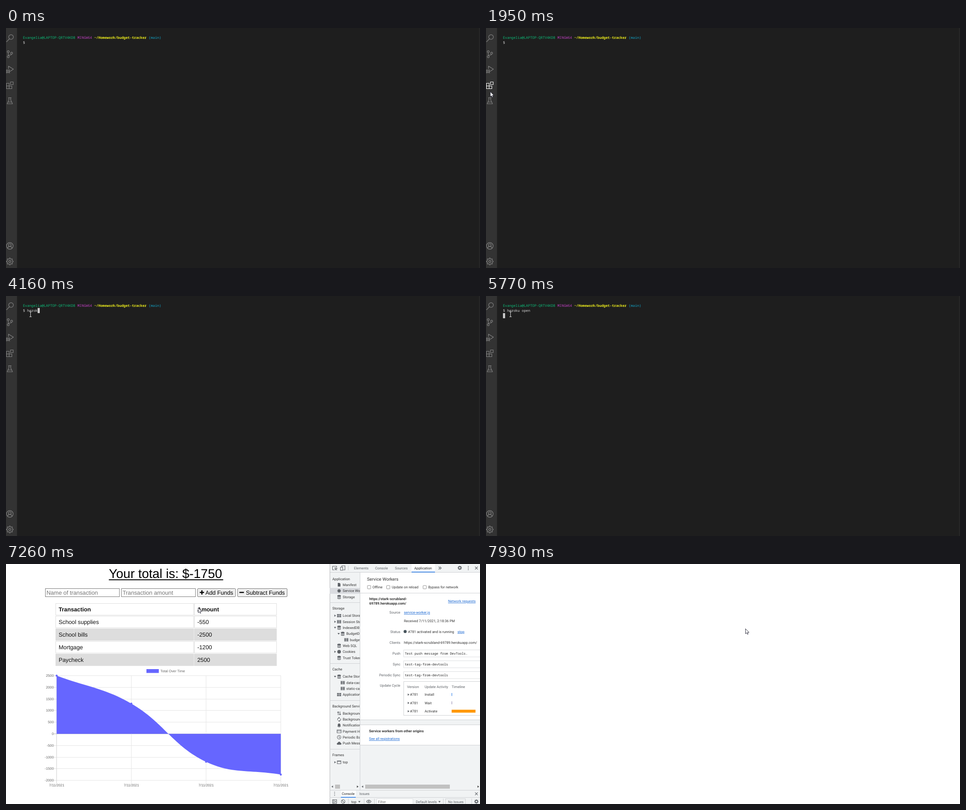
Write an HTML page that moves like this. It is 1053 by 532 pixels and loops after 8 s.

```html
<!DOCTYPE html>
<html lang="en">
<head>
<meta charset="utf-8">
<title>Terminal and budget tracker</title>
<style>
html, body { margin: 0; width: 100%; height: 100%; overflow: hidden; background: #fff; }
svg { display: block; width: 100%; height: 100%; }
text { text-rendering: geometricPrecision; white-space: pre; }
.mono { font-family: "Noto Sans Mono", monospace; }
.arial { font-family: "Liberation Sans", Arial, sans-serif; }
.ui { font-family: Roboto, sans-serif; }
.icon { fill: none; stroke: #858585; stroke-width: 1.15; stroke-linejoin: round; }
.icon.on { stroke: #fff; }
.tool { fill: none; stroke: #5f6368; stroke-width: 1.1; }
</style>
</head>
<body>
<svg id="stage" viewBox="0 0 1053 532" xmlns="http://www.w3.org/2000/svg">
  <defs><clipPath id="sideClip"><rect x="719" y="19" width="67" height="468"/></clipPath></defs>
  <g id="term"></g>
  <g id="page"></g>
  <g id="tip"></g>
  <g id="beam"><path d="M-2.5-5.5h5M-2.5 5.5h5M0-5.5v11" fill="none" stroke="#e4e4e4"/></g>
  <g id="arrow"><path d="M0 0V11.2L2.6 8.8 4.3 12.4 6 11.6 4.4 8.1H7.8Z" fill="#fff" stroke="#223" stroke-width=".9"/></g>
</svg>
<script>
const NS = 'http://www.w3.org/2000/svg';
const $ = id => document.getElementById(id);
const term = $('term'), page = $('page'), tip = $('tip');

function add(parent, tag, attrs, content) {
  const el = document.createElementNS(NS, tag);
  for (const k in attrs) el.setAttribute(k, attrs[k]);
  if (content !== undefined) el.textContent = content;
  parent.appendChild(el);
  return el;
}
const rect = (p, x, y, width, height, fill, more) => add(p, 'rect', { x, y, width, height, fill, ...more });
const text = (p, cls, x, y, s, size, fill, more) =>
  add(p, 'text', { class: cls, x, y, 'font-size': size, fill, ...more }, s);
const path = (p, d, attrs) => add(p, 'path', { d, ...attrs });
const line = (p, d, stroke) => path(p, d, { fill: 'none', stroke });

/* ---- Terminal ---- */
const CELL = 4.655, LEFT = 37.7, MONO = 7.76;
const word = (col, y, s, fill, weight = 400) =>
  text(term, 'mono', LEFT + col * CELL, y, s, MONO, fill, { 'font-weight': weight });

rect(term, 0, 0, 1053, 532, '#1e1e1e');
rect(term, 0, 0, 24.5, 532, '#333');
rect(term, 1051, 0, 1, 532, '#2f2f2f');

const gearPath = (r, teeth = 8) => {
  let d = '';
  for (let i = 0; i < teeth * 4; i++) {
    const a = (i - 0.5) / (teeth * 4) * 2 * Math.PI, q = i % 4 < 2 ? r : r * 0.74;
    d += (i ? 'L' : 'M') + (q * Math.cos(a)).toFixed(2) + ' ' + (q * Math.sin(a)).toFixed(2);
  }
  return d + 'Z';
};
const ring = (x, y, r) => `M${x - r} ${y}a${r} ${r} 0 1 0 ${2 * r} 0a${r} ${r} 0 1 0 ${-2 * r} 0`;

const bar = [
  [23, ring(2.7, -3, 5.2) + 'M-1 1L-7.5 7.8'],
  [58, ring(-3.5, -5.5, 2.2) + ring(-3.5, 5.7, 2.2) + ring(4, -2.2, 2.2) + 'M-3.5-3.3V3.5M4 0C4 3-3.5 1-3.5 3.5'],
  [92, 'M-3-1.5V-7.5L8-.8 0 4.6' + ring(-4, 4, 3) + 'M-7 4h6M-8 .5l2 1.5M0 .5L-2 2M-8 8l2-2M0 8l-2-2'],
  [127, 'M-7.5-4.5h6v6h6v6h-12ZM-7.5 1.5h6v6M1.5-7.5h6v6h-6Z'],
  [161.5, 'M-3.5-7h7M-2-7v5L-6 6.5H6L2-2V-7M-4 2.5H4'],
  [483, ring(0, 0, 7.4) + ring(0, -1.8, 3) + 'M-5 5.3C-4 0 4 0 5 5.3'],
  [517.5, gearPath(7.6) + ring(0, 0, 2.4)]
].map(([y, d]) => ({ y, el: path(term, d, { class: 'icon', transform: `translate(8.5 ${y})` }) }));

word(0, 23.7, 'Evangelia@LAPTOP-QRTV4KD8', '#0dbc79');
word(26, 23.7, 'MINGW64', '#bc3fbc');
word(34, 23.7, '~/Homework/budget-tracker', '#f0f01c', 600);
word(60, 23.7, '(main)', '#11a8cd');
word(0, 35, '$', '#d6d6d6', 500);
const typed = word(2, 35, '', '#d6d6d6', 500);
const block = rect(term, 0, 0, 4.7, 11.3, '#cfcfcf');

rect(tip, 1014.5, 520.5, 23.5, 14, '#e3e3e3', { stroke: '#c9c9c9' });
text(tip, 'ui', 1018, 533, 'Stop', 8, '#555');

/* ---- Budget page ---- */
const PT = 12.75;
const label = (x, y, s, fill = '#111', more) => text(page, 'arial', x, y, s, PT, fill, more);
rect(page, 0, 0, 1053, 532, '#fff');
text(page, 'arial', 228.5, 31, 'Your total is: $-1750', 28.4, '#000');
rect(page, 228.5, 34, 254, 2, '#000');

[[87, 'Name of transaction'], [256, 'Transaction amount']].forEach(([x, s]) => {
  rect(page, x + .5, 54.5, 164.5, 18, '#fff', { stroke: '#767676' });
  label(x + 3, 68, s, '#757575');
});
[[425, 84.5, 'Add Funds', 18], [514, 110, 'Subtract Funds', 19]].forEach(([x, w, s, dx]) => {
  rect(page, x + .5, 54.5, w, 18, '#efefef', { stroke: '#767676', rx: 1.5 });
  label(x + dx, 68, s, '#000');
});
path(page, 'M430.5 63h9.5M435.2 58.3v9.5M518.5 63h10', { stroke: '#000', 'stroke-width': 2.6 });

[['Transaction', 'Amount'], ['School supplies', '-550'], ['School bills', '-2500'], ['Mortgage', '-1200'], ['Paycheck', '2500']]
  .forEach((row, i) => row.forEach((s, c) => {
    const y = 87.5 + i * 28, fill = i && i % 2 === 0 ? '#ddd' : '#fff';
    rect(page, c ? 418.5 : 110.5, y, c ? 182.5 : 306.5, 25.8, fill, { stroke: '#ddd' });
    label(c ? 425 : 117, y + 17, s, '#111', { 'font-weight': i ? 400 : 700 });
  }));

/* ---- Chart ---- */
const BLUE = '#6666ff', X0 = 112.5, DX = 166, ZERO = 376.5;
const yOf = v => ZERO - v * 0.0516;
const small = (x, y, s, anchor) => text(page, 'arial', x, y, s, 7.8, '#666', { 'text-anchor': anchor });
rect(page, 312, 233, 27.5, 8.5, BLUE);
small(343, 239.5, 'Total Over Time', 'start');
for (let v = 2500; v >= -2000; v -= 500) {
  const y = Math.floor(yOf(v)) + .5;
  line(page, `M106 ${y}H610.5`, v ? '#e5e5e5' : '#bfbfbf');
  small(106, y + 2.3, v, 'end');
}
for (let i = 0; i < 4; i++) {
  line(page, `M${X0 + DX * i} 247V486`, i ? '#e5e5e5' : '#cfcfcf');
  small(X0 + DX * i, 493, '7/11/2021', 'middle');
}
const pts = [2500, 1300, -1200, -1750].map((v, i) => ({ x: X0 + DX * i, y: yOf(v) }));
const ctrl = pts.map((p, i) => {
  const a = pts[i - 1] || p, b = pts[i + 1] || p;
  const da = Math.hypot(p.x - a.x, p.y - a.y), db = Math.hypot(b.x - p.x, b.y - p.y);
  const fa = 0.4 * da / (da + db), fb = 0.4 * db / (da + db);
  return {
    before: `${p.x - fa * (b.x - a.x)} ${p.y - fa * (b.y - a.y)}`,
    after: `${p.x + fb * (b.x - a.x)} ${p.y + fb * (b.y - a.y)}`
  };
});
let curve = `M${X0} ${ZERO}V${pts[0].y}`;
for (let i = 1; i < 4; i++) curve += `C${ctrl[i - 1].after} ${ctrl[i].before} ${pts[i].x} ${pts[i].y}`;
path(page, curve + `V${ZERO}Z`, { fill: BLUE });
pts.forEach(p => add(page, 'circle', { cx: p.x, cy: p.y, r: 2.2, fill: BLUE }));

/* ---- Developer tools ---- */
const UI = 7.8, GREY = '#f1f3f4', LINE = '#cfd1d4', INK = '#333', DIM = '#5f6368', LINK = '#1967d2';
const ui = (x, y, s, fill = INK, more, parent = page) => text(parent, 'ui', x, y, s, UI, fill, more);
const link = (x, y, s) => ui(x, y, s, LINK, { 'text-decoration': 'underline' });
const tool = (x, y, d, more, parent = page) => path(parent, d, { class: 'tool', transform: `translate(${x} ${y})`, ...more });
const solid = { style: 'fill:#5f6368;stroke:none' };
const dots = ring(0, -3.5, .9) + ring(0, 0, .9) + ring(0, 3.5, .9);
const cross = 'M-3-3L3 3M3-3L-3 3';
const gear = (x, y, r) => tool(x, y, gearPath(r) + ring(0, 0, r * .38), { style: 'fill:#5f6368;stroke:none;fill-rule:evenodd' });

rect(page, 719, 0, 334, 532, GREY);
rect(page, 787, 19, 266, 326, '#fff');
rect(page, 787, 356, 266, 45, '#fff');
rect(page, 901, 0, 52, 18, '#fff');
line(page, 'M719 18.5H1053M786.5 19V501M787 64.5H1053M787 345.5H1053M787 356.5H1053M787 401.5H1053M760.5 4V14', LINE);
line(page, 'M719.5 0V532', '#b8babd');
rect(page, 901, 17, 52, 1.5, '#1a73e8');
tool(730.5, 9, 'M4-1V-4H-5V4H-1M0-1L5 1 2.5 2.2 4.5 5M0-1L1 4 2.5 2.2');
tool(748, 9, 'M-2-2V-5H5V4H1M-5-2H0V5H-5Z');
[[773, 'Elements'], [820, 'Console'], [864, 'Sources'], [907, 'Application']]
  .forEach(([x, s]) => ui(x, 12, s, s === 'Application' ? '#222' : DIM));
tool(964, 9, 'M-3-3L0 0-3 3M0-3L3 0 0 3');
gear(1008, 8.5, 4.8);
tool(1027, 9, dots, solid);
tool(1045, 9, cross);

const side = add(page, 'g', { 'clip-path': 'url(#sideClip)' });
rect(side, 719, 53, 67, 13, '#dadce0');
[[33.5, 'Application'], [98.5, 'Storage'], [233.5, 'Cache'], [315.5, 'Background Services'], [423.5, 'Frames']]
  .forEach(([y, s]) => ui(725, y + 2.7, s, INK, {}, side));
line(side, 'M719 85.5H786M719 220.5H786M719 302.5H786M719 410.5H786', LINE);

const fills = {
  file: 'M-3-4H1L3-2V4H-3Z',
  gear: gearPath(4.2),
  db: 'M-4-2.7C-4-4.7 4-4.7 4-2.7V-1.8C4 0-4 0-4-1.8ZM-4-.6C-3 .8 3 .8 4-.6V.8C3 2.2-3 2.2-4 .8ZM-4 1.9C-3 3.3 3 3.3 4 1.9V3C4 5-4 5-4 3Z',
  grid: 'M-4.5-3.5H-.4V-1.5H-4.5ZM.4-3.5H4.5V-1.5H.4ZM-4.5-.9H-.4V.9H-4.5ZM.4-.9H4.5V.9H.4ZM-4.5 1.5H-.4V3.5H-4.5ZM.4 1.5H4.5V3.5H.4Z',
  cookie: ring(0, 0, 4),
  bell: 'M-4 3L-3 1.5V-1C-3-5 3-5 3-1V1.5L4 3ZM-1 3.6H1V4.5H-1Z',
  cloud: 'M-3 3C-6 3-5.5-1-3-1C-2-4.5 3-4 3.2-1C6-1 5.5 3 3.5 3Z'
};
const strokes = {
  swap: 'M-2 4V-3.5M-4-1.5L-2-3.5 0-1.5M2-4V3.5M0 1.5L2 3.5 4 1.5',
  sync: 'M-3 2A3.6 3.6 0 0 1 1-3.4M-1-4.8L1-3.4-.5-1.8M3-2A3.6 3.6 0 0 1-1 3.4M1 4.8L-1 3.4 .5 1.8',
  card: 'M-4.5-3.2H4.5V3.2H-4.5ZM-4.5-1H4.5',
  clock: ring(0, 0, 4) + 'M0-2.5V.3L2 1.5',
  frame: 'M-4-3.2H4V3.2H-4ZM-4-2H4'
};
const rows = [
  [46, 'Manifest', 'file'], [59.5, 'Service Workers', 'gear'], [73, 'Storage', 'db'],
  [114.5, 'Local Storage', 'grid', 0, 1], [128, 'Session Storage', 'grid', 0, 1], [141, 'IndexedDB', 'db', 0, 2],
  [154.5, 'BudgetDB', 'db', 1, 2], [168, 'budget', 'grid', 2], [181, 'Web SQL', 'db'],
  [194.5, 'Cookies', 'cookie', 0, 1], [208, 'Trust Tokens', 'db'],
  [249.5, 'Cache Storage', 'db', 0, 2], [263, 'data-cache', 'grid', 1], [276, 'static-cache', 'grid', 1],
  [289.5, 'Application Cache', 'grid'],
  [331, 'Background Fetch', 'swap'], [344.5, 'Background Sync', 'sync'], [357.5, 'Notifications', 'bell'],
  [371, 'Payment Handler', 'card'], [384, 'Periodic Background', 'clock'], [397.5, 'Push Messaging', 'cloud'],
  [439.5, 'top', 'frame', 0, 1]
];
const RIGHT = 'M-1.5-2.5L2 0-1.5 2.5Z', DOWN = 'M-2.5-1.5H2.5L0 2Z';
rows.forEach(([y, s, icon, depth = 0, fold]) => {
  const dx = depth * 8;
  ui(748 + dx, y + 2.7, s, INK, {}, side);
  tool(740 + dx, y, fills[icon] || strokes[icon], fills[icon] ? solid : {}, side);
  if (fold) tool(731 + dx, y, fold === 1 ? RIGHT : DOWN, solid, side);
});

text(page, 'ui', 802, 36.5, 'Service Workers', 9.75, INK);
[[803, 814, 'Offline'], [845.5, 857, 'Update on reload'], [926.5, 938, 'Bypass for network']].forEach(([bx, x, s]) => {
  rect(page, bx, 47.7, 7.3, 7.3, '#fff', { stroke: '#767676', 'stroke-width': .8, rx: 1 });
  ui(x, 54, s);
});
const bold = { 'font-weight': 700 };
ui(807, 79.5, 'https://stark-scrubland-', INK, bold);
ui(807, 90.3, '69789.herokuapp.com/', INK, bold);
link(982, 85, 'Network requests');
[[110, 'Source'], [153, 'Status'], [177, 'Clients'], [201, 'Push'], [225, 'Sync'], [249, 'Periodic Sync'], [272, 'Update Cycle']]
  .forEach(([y, s]) => ui(876, y, s, DIM, { 'text-anchor': 'end' }));
link(884, 110, 'service-worker.js');
ui(884, 129, 'Received 7/11/2021, 2:18:36 PM');
add(page, 'circle', { cx: 886.7, cy: 149.7, r: 3.4, fill: '#47545c' });
ui(893, 152.6, '#781 activated and is running');
link(1003, 152.6, 'stop');
ui(884, 176.7, 'https://stark-scrubland-69789.herokuapp.com/');
[[190, 'Test push message from DevTools.'], [214, 'test-tag-from-devtools'], [238, 'test-tag-from-devtools']].forEach(([y, s]) => {
  rect(page, 883.5, y + .5, 175, 15.5, '#fff', { stroke: '#dcdee0' });
  text(page, 'mono', 886, y + 10.8, s, 7.28, '#222');
});
rect(page, 883.5, 260.5, 175, 75, '#fff', { stroke: LINE });
[[891, 'Version'], [930, 'Update Activity'], [990, 'Timeline']].forEach(([x, s]) => ui(x, 275, s, DIM));
[[289.5, 'Install', 1, '#1a73e8'], [308, 'Wait', 1, '#8a7fa8'], [326.5, 'Activate', 53, '#ff9800']].forEach(([y, s, w, fill]) => {
  tool(894, y, RIGHT, solid);
  ui(897.5, y + 2.7, '#781');
  ui(930, y + 2.7, s);
  rect(page, 990, y - 3.5, w, 6.5, fill);
});
ui(806.5, 372.6, 'Service workers from other origins', INK, bold);
link(806.5, 390, 'See all registrations');

[[731, 11, 725, 781], [798, 188, 792, 1049]].forEach(([x, w, a, b]) => {
  rect(page, x, 489, w, 9, '#c1c1c1');
  tool(a, 493.5, 'M1.5-2.5L-2 0 1.5 2.5Z', solid);
  tool(b, 493.5, RIGHT, { style: 'fill:#444;stroke:none' });
});
line(page, 'M719 501.5H1053M719 517.5H1053', LINE);
rect(page, 744, 502, 33, 15, '#fff');
rect(page, 744, 516.3, 33, 1.5, '#1a73e8');
tool(730, 509.3, dots, solid);
ui(746, 512, 'Console', '#222');
ui(785, 512, 'Issues', DIM);
tool(1045, 509.3, cross);
tool(730, 526.5, 'M-4.5-4H4.5V4H-4.5ZM-2-4V4M0-2L2.5 0 0 2');
tool(749, 526.5, ring(0, 0, 4) + 'M-2.8-2.8L2.8 2.8');
ui(767, 529.5, 'top');
tool(785, 527, DOWN, solid);
tool(806, 526.5, 'M-5 0C-2.5-4.4 2.5-4.4 5 0C2.5 4.4-2.5 4.4-5 0Z' + ring(0, 0, 1.4));
rect(page, 823.5, 520.5, 80.5, 14, '#fff', { stroke: '#dcdee0' });
ui(826.5, 529.7, 'Filter', '#757575');
ui(910.5, 529.5, 'Default levels', DIM);
tool(963, 527, DOWN, solid);
rect(page, 976.5, 520.5, 44, 14, 'none', { stroke: LINE });
ui(982, 529.5, 'No Issues', DIM);
gear(1045, 526.5, 4.8);
line(page, 'M760.5 520V532M795.5 520V532M818.5 520V532M971.5 520V532M1034.5 520V532', LINE);

/* ---- Timeline ---- */
const LOOP = 8000, COMMAND = 'heroku open';
const keys = [3490, 3690, 3760, 3960, 4160, 4360, 4560, 4760, 4960, 5090, 5220];
const ENTER = 5770, BROWSER = 7260, BLANK = 7400;

// start, end, moves, from x, from y, to x, to y
const legs = [
  [1330, 1670, 5, 914, 456, 9, 156],
  [1880, 2160, 4, 9, 150, 13, 94],
  [2230, 2540, 4, 20, 78, 54, 40],
  [6900, 7190, 4, 70, 43, 340, 90],
  [7260, 7470, 3, 427, 97, 576.5, 143.5],
  [7930, 8000, 1, 576.5, 143.5, 576.5, 143.5]
];
const hidden = t => t < 1330 || (t >= 7530 && t < 7930);

function pointer(t) {
  if (hidden(t)) return null;
  const [a, b, n, x0, y0, x1, y1] = legs.filter(l => t >= l[0]).pop();
  const k = Math.min(1, Math.floor((t - a) / (b - a) * n + .02) / n);
  const e = k * k * (3 - 2 * k);
  return { x: x0 + (x1 - x0) * e, y: y0 + (y1 - y0) * e };
}
const show = (el, on) => el.setAttribute('display', on ? 'inline' : 'none');

function draw(t) {
  show(term, t < BROWSER);
  show(page, t >= BROWSER && t < BLANK);

  const n = keys.filter(k => t >= k).length, entered = t >= ENTER;
  typed.textContent = COMMAND.slice(0, n);
  show(block, t >= 2680);
  block.setAttribute('x', LEFT + (entered ? 0 : (n + 2) * CELL));
  block.setAttribute('y', entered ? 38 : 26.6);

  show(tip, t >= 520 && t < 1470);
  tip.setAttribute('opacity', t < 590 ? .35 : t < 660 ? .7 : 1);

  const p = pointer(t), onBar = p && p.x < 24.5;
  const useArrow = p && (onBar || t >= BROWSER);
  show($('arrow'), useArrow);
  show($('beam'), p && !useArrow);
  if (p) {
    const at = useArrow ? `${p.x} ${p.y}` : `${Math.round(p.x) + .5} ${Math.round(p.y) + .5}`;
    $(useArrow ? 'arrow' : 'beam').setAttribute('transform', `translate(${at})`);
  }
  bar.forEach(b => b.el.classList.toggle('on', !!onBar && Math.abs(p.y - b.y) < 17));
}

function tick() {
  draw(performance.now() % LOOP);
  requestAnimationFrame(tick);
}
tick();
</script>
</body>
</html>
```
